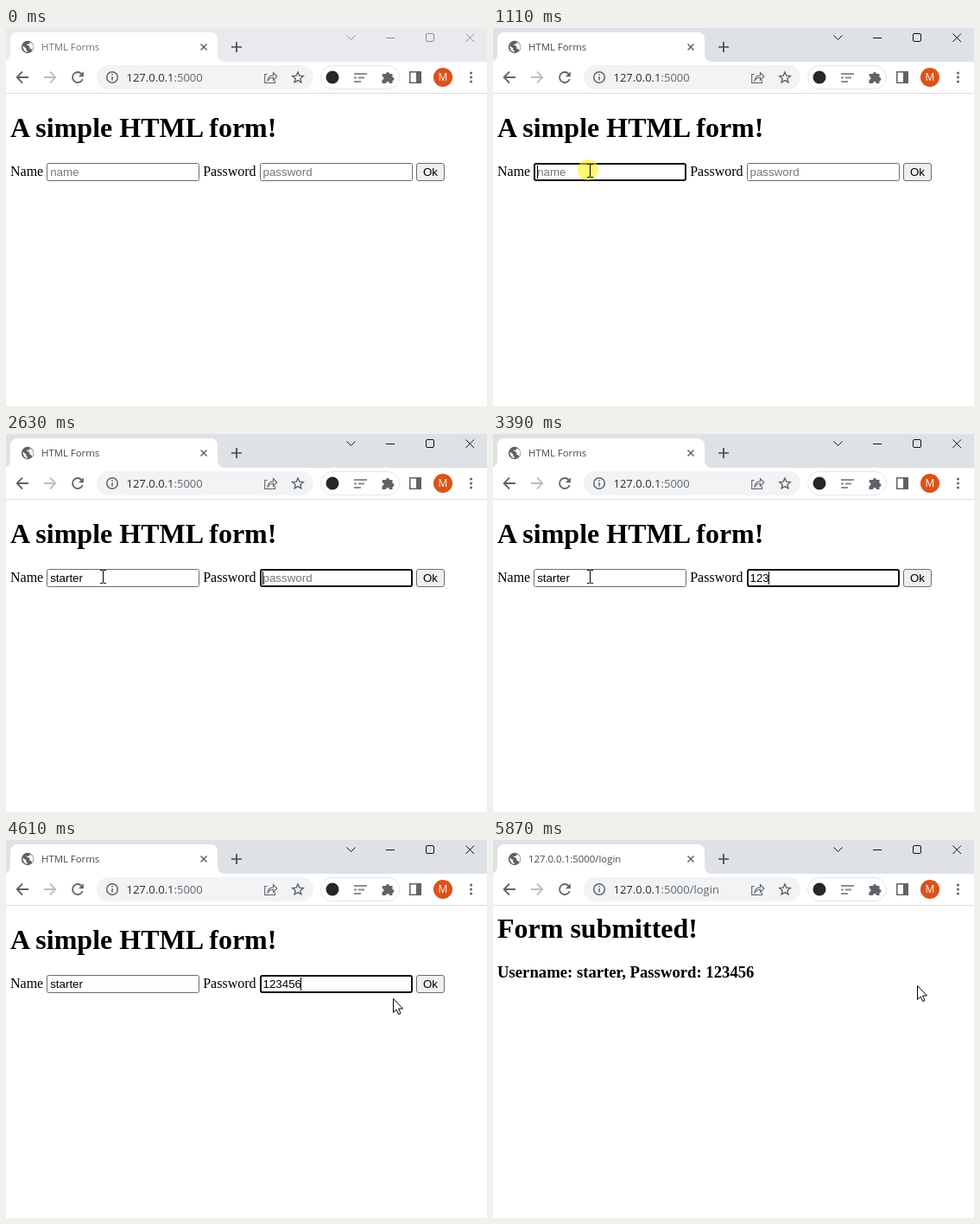
Recreate the animation shown at these times as an HTML page. Size 557 px wide and 437 px high, loop 8.83 s.

```html
<!DOCTYPE html>
<html lang="en">
<head>
<meta charset="utf-8">
<title>HTML Forms</title>
<style>
  html, body { margin: 0; width: 100%; height: 100%; overflow: hidden; background: #fff; }
  svg { display: block; width: 557px; height: 437px; }
  .ui { font-family: "Open Sans", "Noto Sans", sans-serif; }
  .page { font: 16px "Liberation Serif", "Times New Roman", serif; }
  .field { font: 13.333px "Liberation Sans", Arial, sans-serif; }
  .h1 { font-size: 32px; font-weight: bold; }
  .h3 { font-size: 18.72px; font-weight: bold; }
  .line { fill: none; stroke: #5f6368; stroke-width: 1.5; }
  .solid { fill: #5f6368; }
  #strip { fill: #e8eaed; }
  #controls { fill: none; stroke: #8e9093; }
  #title { font-size: 11.4px; fill: #6f7377; }
  .active #strip { fill: #dee1e6; }
  .active #controls { stroke: #111; }
  .active #title { fill: #45494d; }
  .box { fill: #fff; stroke: #6c6c6c; }
  .focus .box { stroke: #101010; stroke-width: 2; }
  .caret { display: none; }
  .focus .caret { display: inline; }
  .empty text { fill: #757575; }
  #button rect { fill: #efefef; stroke: #6c6c6c; }
  #button.down rect { fill: #f5f5f5; stroke: #a2a2a2; }
</style>
</head>
<body>
<svg id="stage" viewBox="0 0 557 437">
  <g id="chrome" class="ui">
    <rect id="strip" width="557" height="39"/>
    <path d="M-3 39a8 8 0 0 0 8-8V13a8 8 0 0 1 8-8H237a8 8 0 0 1 8 8V31a8 8 0 0 0 8 8z" fill="#fff"/>
    <path d="M0 75.5H557" stroke="#dadce0"/>

    <circle cx="25" cy="22" r="7.2" class="solid"/>
    <path d="M19.3 20.5l4 3v2l1.5 1v1.5q-5-1-5.5-7.500zM22 20h4l1.500 2v2h1.500l1.300 2q1.500-2 1.300-4.500-.5-3.500-4-5.200v1.200l-1.500 1.300h-2v1.200z" fill="#fff"/>
    <text id="title" x="41" y="26"></text>
    <path class="line" d="M225.500 18.500l7 7m0-7l-7 7"/>
    <path class="line" d="M261 22h12M267 16v12" style="stroke:#45484c;stroke-width:1.700"/>
    <g id="controls">
      <path d="M394.500 8.500l5 5 5-5M440 11.500h10M532.500 6.500l9.500 9.500m0-9.500l-9.500 9.500"/>
      <rect x="486.500" y="6.500" width="9" height="9" rx="1.500"/>
    </g>

    <path class="line" d="M26 57H13M19 50.500L12.700 57 19 63.500" style="stroke-width:1.800"/>
    <path class="line" d="M44 57H57M51 50.500L57.300 57 51 63.500" style="stroke:#bcbec1;stroke-width:1.800"/>
    <path class="line" d="M87.500 53A6 6 0 1 0 88.700 59" style="stroke-width:1.800"/>
    <path class="solid" d="M89.800 50.300V56.300H83.800z"/>

    <rect x="105" y="43" width="251" height="28" rx="14" fill="#f1f3f4"/>
    <circle class="line" cx="123" cy="57" r="6.300"/>
    <path class="line" d="M123 56v4.500M123 53v1.600"/>
    <text x="139.500" y="62" font-size="13" fill="#2b2e32">127.0.0.1<tspan fill="#64686d" id="path"></tspan></text>
    <path class="line" d="M302.500 53.500H299.700V63.500H311.500V60.500M303 61q.5-6 6.500-6.300V51.500L313.800 56 309.500 60.300V57.300q-4 0-6.500 3.700z" style="stroke-width:1.100"/>
    <path class="line" d="M338 51l1.800 4.100 4.500.4-3.400 3 1 4.400-3.900-2.300-3.900 2.300 1-4.400-3.400-3 4.500-.4z" style="stroke-width:1.400"/>

    <rect x="364.500" y="43.500" width="91" height="27" rx="13.500" fill="#fff" stroke="#e3e5e8"/>
    <circle cx="378" cy="57" r="7.500" fill="#25272a"/>
    <path d="M403 53h15M403 57.500h3m2 0h7M403 62h8" stroke="#8b8e93" stroke-width="2"/>
    <path class="solid" d="M436 53h4a2 2 0 1 1 4 0h3.500v4a2 2 0 1 1 0 4v3H444a2 2 0 0 0-4 0h-4.500v-4a2 2 0 0 0 0-4z"/>
    <rect class="line" x="467.800" y="50.800" width="12.500" height="12.500"/>
    <rect class="solid" x="475" y="50" width="6" height="14"/>
    <circle cx="506" cy="57" r="11" fill="#dc5218"/>
    <text x="506" y="61.300" font-size="12" text-anchor="middle" fill="#fff">M</text>
    <g class="solid">
      <circle cx="538.500" cy="52" r="1.500"/><circle cx="538.500" cy="57" r="1.500"/><circle cx="538.500" cy="62" r="1.500"/>
    </g>
  </g>

  <g id="form" class="page">
    <text class="h1" x="5" y="126">A simple HTML form!</text>
    <text x="5" y="171">Name</text>
    <g id="name" class="field">
      <rect class="box" rx="2"/>
      <text x="51.200" y="171"></text>
      <path class="caret" stroke="#000"/>
    </g>
    <text x="228.200" y="171">Password</text>
    <g id="password" class="field">
      <rect class="box" rx="2"/>
      <text x="297.500" y="171"></text>
      <path class="caret" stroke="#000"/>
    </g>
    <g id="button" class="field">
      <rect x="475.500" y="156.500" width="32" height="20" rx="2.500"/>
      <text x="483" y="171">Ok</text>
    </g>
  </g>

  <g id="result" class="page">
    <text class="h1" x="5" y="113">Form submitted!</text>
    <text class="h3" x="5" y="159" id="summary"></text>
  </g>

  <circle id="ring" r="12" fill="#fff000" opacity=".55"/>
  <path id="beam" d="M-3.500-7.500H-1L0-7 1-7.500H3.500M0-7V7M-3.500 7.500H-1L0 7 1 7.500H3.500" fill="none" stroke="#000"/>
  <path id="arrow" d="M.5.500V16.500L4.200 13 6.600 18.500 9 17.500 6.600 12H11.500z" fill="#fff" stroke="#000"/>
</svg>
<script>
const LOOP = 8830, FRAME = 60;
const CLICK = 1010, TAB = 2630, LEAVE = 4240, PRESS = 4850, SUBMIT = 5010;
const USER = "starter", PASS = "123456";
const userKeys = [1670, 1760, 1870, 2020, 2170, 2270, 2430];
const passKeys = [3090, 3240, 3390, 3650, 3950, 4200];
// Cursor stops: time, x, y
const enter = [[500, 190, 416], [620, 172, 340], [740, 146, 250], [860, 121, 186], [920, 113, 165]];
const leave = [[LEAVE, 113, 165], [4300, 238, 171], [4420, 350, 183], [4540, 428, 186],
               [4660, 470, 179], [4780, 491, 168.5]];

const $ = id => document.getElementById(id);
const show = (id, on) => $(id).setAttribute("display", on ? "inline" : "none");
const place = (id, x, y) => $(id).setAttribute("transform", `translate(${x} ${y})`);
const typed = (word, keys, t) => word.slice(0, keys.filter(k => k <= t).length);

function along(stops, t) {
  t = stops[0][0] + Math.floor((t - stops[0][0]) / FRAME) * FRAME;
  const i = stops.findIndex(s => s[0] > t);
  if (i < 0) return stops[stops.length - 1].slice(1);
  const [a, b] = [stops[i - 1], stops[i]], k = (t - a[0]) / (b[0] - a[0]);
  return [1, 2].map(n => Math.round(a[n] + (b[n] - a[n]) * k));
}

function drawField(id, left, value, focus) {
  const group = $(id), text = group.querySelector("text");
  group.setAttribute("class", `field ${focus ? "focus" : ""} ${value ? "" : "empty"}`);
  const inset = focus ? 1 : 0.5, box = group.querySelector("rect");
  const size = { x: left + inset, y: 156 + inset, width: 177 - 2 * inset, height: 21 - 2 * inset };
  for (const key in size) box.setAttribute(key, size[key]);
  text.textContent = value || id;
  const end = +text.getAttribute("x") + (value ? text.getComputedTextLength() : 0);
  group.querySelector(".caret").setAttribute("d", `M${Math.floor(end) + 0.5} 159V174`);
}

function drawCursor(t) {
  const [x, y] = t < LEAVE ? along(enter, t < 500 ? 500 : t) : along(leave, t);
  const beam = t >= 920 && t < LEAVE;
  show("beam", beam);
  show("arrow", t >= 500 && !beam);
  place("beam", x - 0.5, y);
  place("arrow", x - (t < 5870 ? 1 : 0), Math.floor(y));
  const first = t >= CLICK && t < 1210;
  show("ring", first || (t >= PRESS && t < SUBMIT));
  place("ring", first ? 110 : 489, first ? 164 : 168);
}

function draw() {
  const t = performance.now() % LOOP, done = t >= SUBMIT;
  $("stage").setAttribute("class", t >= CLICK ? "active" : "");
  $("title").textContent = done ? "127.0.0.1:5000/login" : "HTML Forms";
  $("path").textContent = done ? ":5000/login" : ":5000";
  show("form", !done);
  show("result", done);
  if (!done) {
    drawField("name", 47, typed(USER, userKeys, t), t >= CLICK && t < TAB);
    drawField("password", 294, typed(PASS, passKeys, t), t >= TAB && t < PRESS);
    $("button").setAttribute("class", t >= PRESS ? "field down" : "field");
  }
  drawCursor(t);
  requestAnimationFrame(draw);
}

$("summary").textContent = `Username: ${USER}, Password: ${PASS}`;
draw();
</script>
</body>
</html>
```
